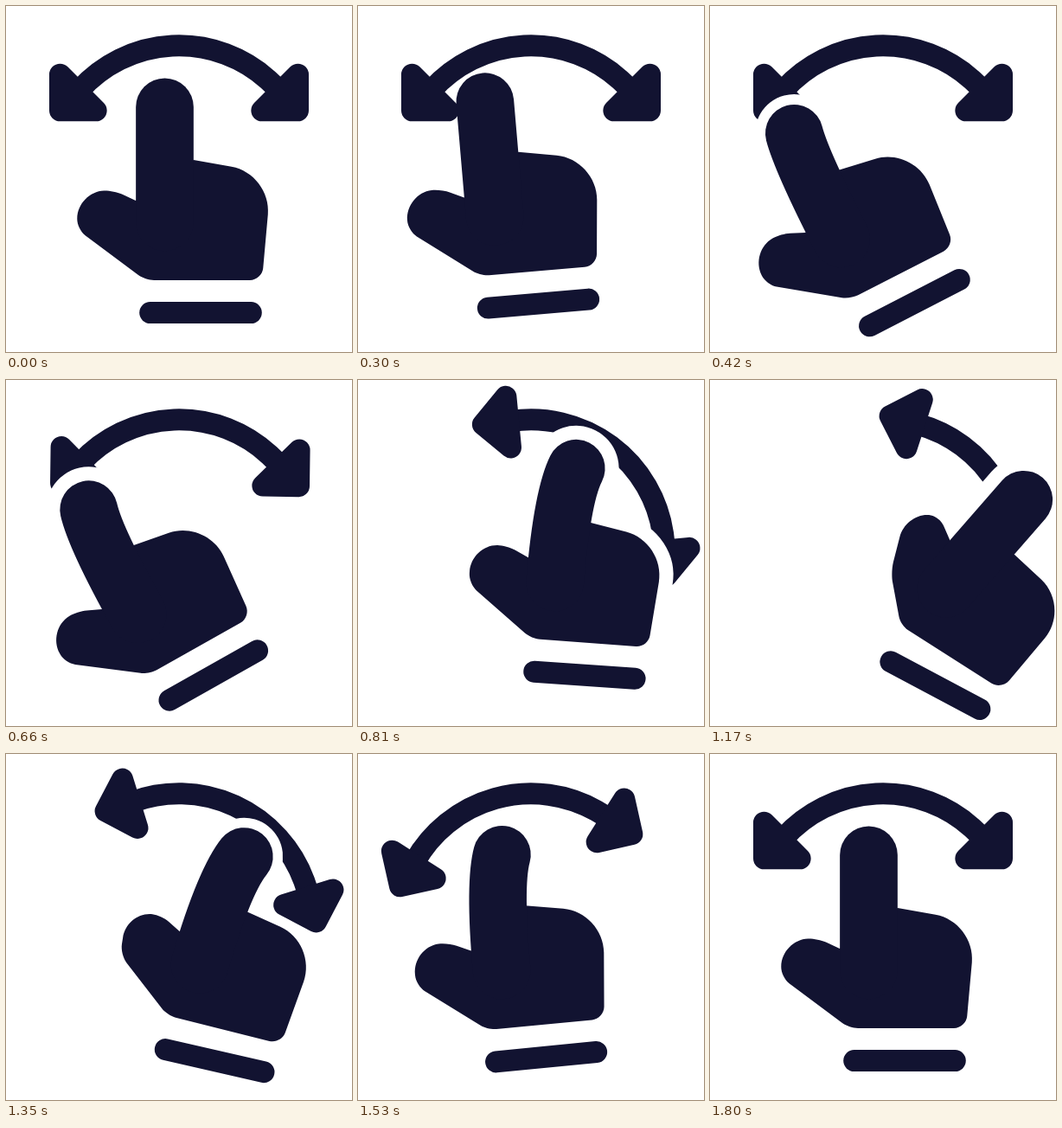
Write an HTML page with a canvas that moves like this. It is 400 by 400 pixels and loops after 3.83 s.

```html
<!DOCTYPE html>
<html lang="en">
<head>
<meta charset="utf-8">
<title>Swipe gesture</title>
<style>
html, body { margin: 0; width: 100%; height: 100%; overflow: hidden; background: #fff; }
canvas { display: block; width: 400px; height: 400px; }
</style>
</head>
<body>
<canvas id="stage" width="400" height="400"></canvas>
<script>
const ctx = document.getElementById('stage').getContext('2d');
const INK = '#121331', PAPER = '#fff';
const LOOP = 3830, STEP = 30;
const LINE = 25, FINGER = 66.7, HALO = 16;

const rad = d => d * Math.PI / 180;
const mix = (a, b, k) => a.map((v, i) => v + (b[i] - v) * k);

const linear = u => u;
const easeIn = u => u * u;
const easeOut = u => u * (2 - u);
const smooth = u => u * u * (3 - 2 * u);

// Eases in gently, rushes, then settles slowly: cubic-bezier(.33, 0, .1, 1).
function rush(u) {
  let lo = 0, hi = 1;
  for (let i = 0; i < 24; i++) {
    const s = (lo + hi) / 2, r = 1 - s;
    if (3 * s * r * r * 0.33 + 3 * s * s * r * 0.1 + s ** 3 < u) lo = s; else hi = s;
  }
  return smooth(lo);
}

// Hand x, hand y, hand angle, arrow angle.
const REST = [193, 200, 0, 0];
const LEAN = [163.4, 192.8, -4.9, 0];
const LEFT = [134, 223.7, -30, 0];
const RIGHT = [304.7, 201.6, 28, 63];
const OVER = mix(RIGHT, REST, 1.22);

// A move ends at `end` in pose `to`; `bow` bends its path sideways halfway.
const MOTION = [
  { end: 0, to: REST },
  { end: 300, to: LEAN, ease: easeIn },
  { end: 480, to: LEFT, ease: easeOut },
  { end: 630, to: LEFT, ease: linear },
  { end: 1170, to: RIGHT, ease: rush, bow: [3, -27, -1.4, 1.3] },
  { end: 1560, to: OVER, ease: smooth, bow: [0, -4, 0, -1.3] },
  { end: 1800, to: REST, ease: smooth }
];

// Finger bend and halo strength.
const SHAPE = [
  { end: 0, to: [0, 0] },
  { end: 300, to: [0, 0], ease: linear },
  { end: 480, to: [0.32, 1], ease: smooth },
  { end: 630, to: [0.32, 1], ease: linear },
  { end: 1170, to: [1, 1], ease: smooth },
  { end: 1800, to: [0, 0], ease: linear }
];

function sample(track, t) {
  const k = track.findIndex(m => t < m.end);
  if (k < 0) return track[track.length - 1].to;
  const a = track[k - 1], b = track[k];
  const p = b.ease((t - a.end) / (b.end - a.end));
  const v = mix(a.to, b.to, p);
  return b.bow ? v.map((n, i) => n + b.bow[i] * Math.sin(Math.PI * p)) : v;
}

// Palm and thumb corners: x, y, rounding, then the shift when the thumb tucks in.
const CORNERS = [
  [150, 225, 0, 12, -26],
  [217, 178, 0, 18, 0],
  [307, 194, 47, 14, 7],
  [296, 317, 14, -1, 6],
  [161, 317, 10, -4, -5],
  [82, 258, 12, 36, 5],
  [83, 214.5, 31, 18, -22],
  [124, 213, 11, 14, -33]
];

function palmPath(tuck) {
  const n = CORNERS.length;
  const pts = CORNERS.map(([x, y, r, dx, dy]) => ({ p: [x + dx * tuck, y + dy * tuck], r }));
  const cut = (a, b) => {
    const len = Math.hypot(b.p[0] - a.p[0], b.p[1] - a.p[1]);
    return mix(a.p, b.p, a.r ? a.r / Math.max(len, a.r + b.r) : 0);
  };
  const path = new Path2D();
  pts.forEach((v, i) => {
    const from = cut(v, pts[(i + n - 1) % n]), to = cut(v, pts[(i + 1) % n]);
    path.lineTo(...from);
    path.bezierCurveTo(...mix(from, v.p, 0.55), ...mix(to, v.p, 0.55), ...to);
  });
  path.closePath();
  return path;
}

function fingerPath(bend, tuck) {
  const path = new Path2D();
  path.moveTo(183.5, 250);
  path.quadraticCurveTo(183.5 + 23 * tuck, 150, 183.5 + 31 * bend, 116.8);
  return path;
}

function stroke(path, color, width, cap = 'round') {
  ctx.strokeStyle = color;
  ctx.lineWidth = width;
  ctx.lineCap = cap;
  ctx.stroke(path);
}

function drawArrow(angle) {
  ctx.save();
  ctx.translate(200, 200);
  ctx.rotate(rad(angle));
  const arc = new Path2D();
  arc.arc(0, 0, 154.17, rad(222), rad(318));
  stroke(arc, INK, LINE);
  for (const side of [-1, 1]) {
    const head = new Path2D();
    head.moveTo(side * 137.5, -120.83);
    head.lineTo(side * 137.5, -79.17);
    head.lineTo(side * 95.83, -79.17);
    head.closePath();
    ctx.fill(head);
    stroke(head, INK, LINE);
  }
  ctx.restore();
}

function drawHand(x, y, angle, bend, halo) {
  const tuck = bend ** 4;
  const palm = palmPath(tuck), finger = fingerPath(bend, tuck);
  ctx.save();
  ctx.translate(x, y);
  ctx.rotate(rad(angle));
  ctx.translate(-REST[0], -REST[1]);
  if (halo > 0) {
    stroke(palm, PAPER, 2 * HALO * halo);
    stroke(finger, PAPER, FINGER + 2 * HALO * halo);
  }
  ctx.fill(palm);
  stroke(finger, INK, FINGER);
  const wrist = new Path2D();
  wrist.moveTo(166.7, 354.6);
  wrist.lineTo(283.3, 354.6);
  stroke(wrist, INK, LINE);
  ctx.restore();
}

function draw(t) {
  const [x, y, angle, arrow] = sample(MOTION, t);
  const [bend, halo] = sample(SHAPE, t);
  ctx.fillStyle = PAPER;
  ctx.fillRect(0, 0, 400, 400);
  ctx.fillStyle = INK;
  ctx.lineJoin = 'round';
  drawArrow(arrow);
  drawHand(x, y, angle, bend, halo);
}

const start = performance.now();
function tick() {
  const t = Math.max(0, performance.now() - start) % LOOP;
  draw(Math.floor(t / STEP) * STEP);
  requestAnimationFrame(tick);
}
tick();
</script>
</body>
</html>
```
